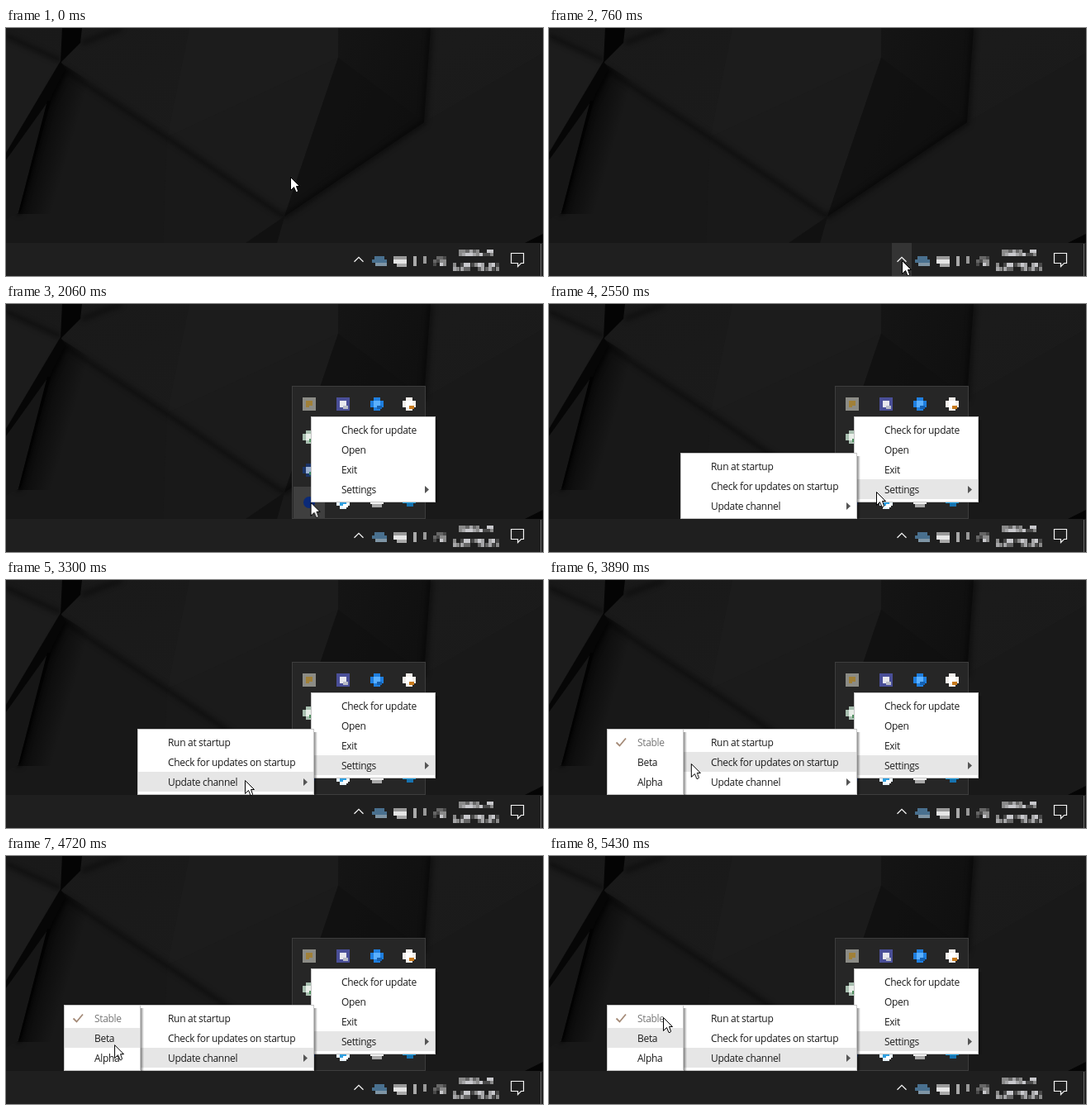
Recreate the animation shown at these times as an HTML page. Size 650 by 300 pixels, loop 5.59 s.

```html
<!DOCTYPE html>
<html lang="en">
<head>
<meta charset="utf-8">
<title>Tray menu</title>
<style>
  html, body { margin: 0; width: 100%; height: 100%; overflow: hidden; background: #1a1a1a; }
  svg { display: block; width: 650px; height: 300px; }
  text { font: 12px "Open Sans", "Noto Sans", sans-serif; letter-spacing: -.31px; fill: #1c1c1c; }
  .off { fill: #777; }
  .hl { fill: #e6e6e6; }
</style>
</head>
<body>
<svg viewBox="0 0 650 300">
  <defs>
    <linearGradient id="facet" x1="0" y1="0" x2="1" y2=".5">
      <stop offset="0" stop-color="#171717"/><stop offset="1" stop-color="#0f0f0f"/>
    </linearGradient>
    <linearGradient id="base" x1="0" y1="0" x2="1" y2="1">
      <stop offset="0" stop-color="#191919"/><stop offset=".45" stop-color="#1b1b1b"/><stop offset="1" stop-color="#181818"/>
    </linearGradient>
    <linearGradient id="ridge" gradientUnits="userSpaceOnUse" x1="40" y1="134" x2="78" y2="145">
      <stop offset="0" stop-opacity=".6"/><stop offset="1" stop-opacity="0"/>
    </linearGradient>
    <linearGradient id="shade">
      <stop offset="0" stop-opacity=".45"/><stop offset="1" stop-opacity="0"/>
    </linearGradient>
    <filter id="soft" x="-20%" y="-20%" width="140%" height="140%" color-interpolation-filters="sRGB">
      <feGaussianBlur stdDeviation="3"/>
    </filter>
  </defs>

  <!-- wallpaper -->
  <rect width="650" height="300" fill="url(#base)"/>
  <path d="M222 0H402V36L195 132Z" fill="#1c1c1c"/>
  <path d="M402 36 337 228 195 132Z" fill="#1b1b1b"/>
  <path d="M70 50 195 132 190 260H0V232L15 226Z" fill="#181818"/>
  <path d="M195 132 337 228 290 260H190Z" fill="#191919"/>
  <path d="M506 114 650 30V260H328L337 228Z" fill="#191919"/>
  <path d="M0 10 66 40 0 150Z" fill="#1c1c1c"/>
  <path d="M66 42 125 80 60 225H14Z" fill="url(#ridge)"/>
  <path d="M402 0H514L506 114 337 228 402 36Z" fill="url(#facet)"/>
  <path d="M402 36 506 114 337 228Z" fill="#101010" opacity=".6"/>
  <g fill="none" stroke="#000" stroke-opacity=".5" stroke-width="5" filter="url(#soft)">
    <path d="M68 48 195 132 337 228M0 10 66 40M92 18 140 0"/>
    <path d="M337 228 506 114 514 0" stroke-width="6"/>
    <path d="M70 50 48 95 14 225" stroke-opacity=".8" stroke-width="8"/>
  </g>
  <path d="M337 228 290 260H328Z" fill="#111"/>
  <path d="M68 0H92L90 18 66 42Z" fill="#040404"/>
  <path d="M66 40 72 50 50 92 0 160V151Z" fill="#060606"/>
  <path d="M50 90 15 224 0 232V160Z" fill="#161616"/>
  <path d="M50 88 15 224 18 220 54 88Z" fill="#020202"/>
  <path d="M628 260 650 249V260Z" fill="#050505"/>

  <!-- taskbar -->
  <rect y="260" width="650" height="40" fill="#1f1f1f"/>
  <rect x="415" y="260" width="24" height="40" fill="#343434" data-show="chevron"/>
  <path d="M421.500 282.800 427 277.300 432.500 282.800" fill="none" stroke="#f2f2f2" stroke-width="1.3"/>
  <g id="tray" shape-rendering="crispEdges"></g>
  <path d="M611.5 272.500H626.5V284.5H623.500L619.5 288.5V284.5H611.5Z" fill="none" stroke="#f4f4f4" stroke-width="1.2"/>
  <path d="M647.5 261V300" stroke="#6a6a6a"/>

  <!-- hidden icons -->
  <g data-show="popup">
    <rect x="346.5" y="99.5" width="161" height="160" fill="#262626" stroke="#3d3d3d"/>
    <rect x="348" y="221" width="38" height="38" fill="#3f3f3f" data-show="cell"/>
    <g id="icons" shape-rendering="crispEdges"></g>
    <circle cx="367" cy="240" r="7" fill="#0b2a78"/>
  </g>

  <g id="menus"></g>

  <path id="cursor" d="M.5.5V16.500L4.500 12.500 7 18.500H8.500L9.500 17 7.500 11.500H11.500Z" fill="#fff" stroke="#000"/>
</svg>
<script>
const LOOP = 5590;
const $ = id => document.getElementById(id);
const pct = ms => (ms / LOOP * 100).toFixed(3) + '%';
const rect = (x, y, w, h, attrs) => `<rect x="${x}" y="${y}" width="${w}" height="${h}" ${attrs}/>`;
const box = (x, y, w, h, color) => rect(x, y, w, h, `fill="${color}"`);

function mosaic(x, y, cols, rows, size, colors, density, seed) {
  const random = () => (seed = seed * 16807 % 2147483647) / 2147483647;
  let out = '';
  random(); random();
  for (let r = 0; r < rows; r++) {
    for (let c = 0; c < cols; c++) {
      const color = colors[Math.floor(random() * colors.length)];
      if (random() < density) out += box(x + c * size, y + r * size, size, size, color);
    }
  }
  return out;
}

const greys = ['#666', '#8a8a8a', '#a6a6a8', '#c8c8cc', '#4a4a4a'];
$('tray').innerHTML =
  box(446, 276, 12, 4, '#49708f') + box(443, 280, 18, 4, '#49708f') + box(447, 284, 14, 4, '#7f95a5') +
  box(469, 276, 16, 4, '#999') + box(469, 280, 16, 5, '#e6e6e6') + box(473, 285, 12, 4, '#aaa') +
  box(493, 276, 4, 12, '#aaa') + box(505, 276, 4, 9, '#999') +
  mosaic(517, 276, 4, 3, 4, greys, .6, 811) +
  mosaic(548, 268, 10, 2, 4.2, greys, .9, 4021) +
  mosaic(541, 284, 13, 2, 5, greys, .9, 977).replace(/width="5"/g, 'width="4"').replace(/ x="(\d+)"/g, (m, x) => ` x="${541 + (x - 541) * .86}"`);

// Coarse tray icon: body, centre, lower right accent
function icon(x, y, body, core, accent, square) {
  const base = square ? box(x, y, 16, 16, body) : box(x, y + 4, 16, 8, body) + box(x + 4, y, 8, 16, body);
  return base + box(x + 4, y + 4, 8, 8, core) + box(x + 8, y + 10, 6, 4, accent);
}
const icons = [
  ['#8c8c86', '#a08038', '#8c8c86', true], ['#4a4f98', '#e8e8ee', '#b9bcc8', true],
  ['#1f7fe0', '#5bb0ff', '#1560b0'], ['#f4f0ec', '#fff', '#c87a1c'],
  ['#a8bfb0', '#e8eee8', '#4f8f5f'], ['#1e9be8', '#4cc0f5', '#0f6fc0', true],
  ['#a8640c', '#c8760f', '#262626'], ['#4c55b0', '#7078c8', '#6f8f70'],
  ['#1b3468', '#9ab0d0', '#2f7f5f'], ['#0f2f5f', '#2f8fd0', '#101820'],
  ['#2f80c0', '#4fa8c0', '#4f9f50'], null,
  null, ['#e8f4fc', '#2f9fe0', '#fff'], null, null
];
$('icons').innerHTML = icons.map((look, i) =>
  look ? icon([359, 400, 441, 480][i % 4], [113, 153, 193, 232][i >> 2], ...look) : '').join('') +
  box(480, 195, 16, 4, '#4f4f10') + box(484, 199, 12, 4, '#111') + box(488, 203, 8, 5, '#aaa890') +
  box(441, 234, 16, 4, '#d8d8d8') + box(441, 238, 16, 4, '#f0f0f0') + box(443, 242, 12, 4, '#aaa') +
  box(480, 237, 16, 4, '#1f9fe0') + box(485, 241, 8, 4, '#1673b0');

// Items: [label, name of its highlight, has submenu]
function menu(name, x, y, w, items, textX) {
  const h = items.length * 24 + 8;
  const rows = items.map(([label, highlight, sub], i) => {
    const top = y + 4 + i * 24;
    return (highlight ? rect(x + 1, top, w - 2, 24, `class="hl" data-show="${highlight}"`) : '') +
      `<text x="${textX}" y="${top + 17}"${label === 'Stable' ? ' class="off"' : ''}>${label}</text>` +
      (sub ? `<path d="M${x + w - 13} ${top + 8}l5 4.500-5 4.500z" fill="#555"/>` : '');
  }).join('');
  return `<g data-show="${name}">` +
    rect(x + w, y + 4, 4, h - 4, 'fill="url(#shade)"') +
    rect(x + .5, y + .5, w - 1, h - 1, 'fill="#fff" stroke="#c6c6c6"') + rows +
    (name === 'channels' ? '<path d="M81.500 196.500 85.500 200.500 93 191.500" fill="none" stroke="#a58b78" stroke-width="1.800"/>' : '') +
    '</g>';
}
$('menus').innerHTML =
  menu('main', 369, 136, 151, [['Check for update'], ['Open'], ['Exit'], ['Settings', 'settings', true]], 406) +
  menu('options', 159, 180, 214, [['Run at startup'], ['Check for updates on startup', 'check'], ['Update channel', 'update', true]], 196) +
  menu('channels', 70, 180, 93, [['Stable'], ['Beta', 'beta'], ['Alpha', 'alpha']], 107);

// Times at which each part turns on, off, on ...
const toggles = {
  chevron: [630, 1100], popup: [840], cell: [1295, 2550],
  main: [1730], settings: [2160], options: [2550],
  check: [2935, 2985, 3780, 3930], update: [2985, 3780, 3930],
  channels: [3400], beta: [3930, 4770, 5210], alpha: [4770, 5210]
};
let css = '';
for (const [name, times] of Object.entries(toggles)) {
  const steps = times.map((t, i) => `${pct(t)}{opacity:${1 - i % 2}}`).join('');
  css += `@keyframes ${name}{0%{opacity:0}${steps}100%{opacity:${times.length % 2}}}
    [data-show=${name}]{animation:${name} ${LOOP}ms step-end infinite}`;
}

// Pointer stops: [ms, x, y, easing towards the next stop]
const path = [
  [0, 344, 180], [30, 344, 180, 'ease-in-out'], [720, 427, 281], [930, 427, 281, 'ease-in'],
  [1150, 414, 260], [1370, 372, 244, 'ease-out'], [1540, 368, 240], [2030, 368, 240, 'ease-in-out'],
  [2350, 396, 227], [2750, 396, 227, 'ease-in-out'], [3300, 289, 242], [3610, 289, 242, 'ease-in'],
  [3890, 172, 222, 'ease-out'], [4180, 129, 202, 'ease-out'], [4300, 129, 188], [4430, 129, 188, 'ease-in'],
  [4720, 131, 228, 'ease-out'], [5000, 135, 250], [5070, 135, 250, 'ease-in-out'], [5430, 138, 195], [LOOP, 138, 195]
];
css += '@keyframes point{' + path.map(([t, x, y, ease = 'linear']) =>
  `${pct(t)}{transform:translate(${x}px,${y}px);animation-timing-function:${ease}}`).join('') +
  `}#cursor{animation:point ${LOOP}ms infinite}`;

const style = document.createElement('style');
style.textContent = css;
document.head.append(style);
</script>
</body>
</html>
```
